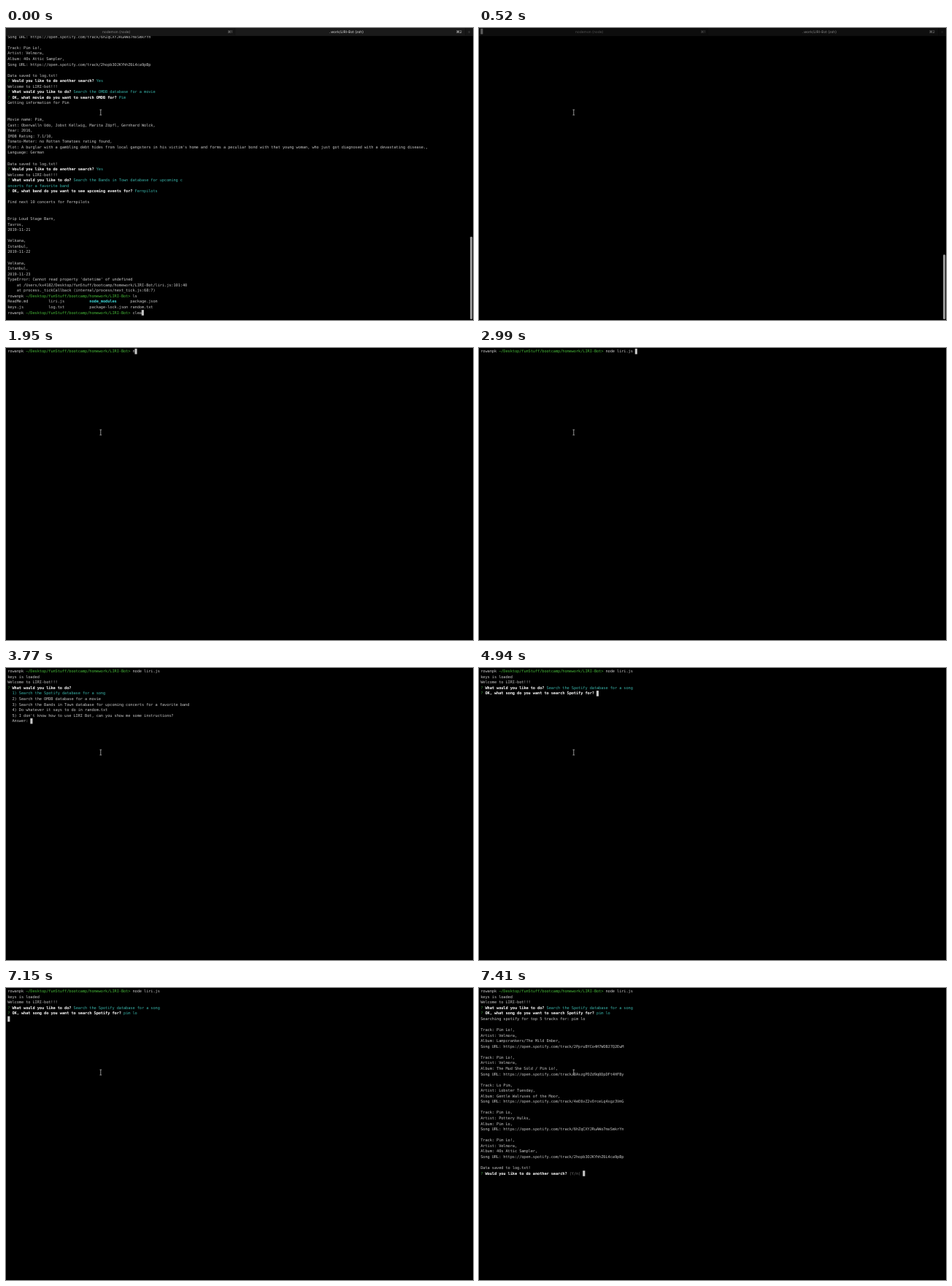
Write an HTML page that moves like this. It is 640x400 px and loops after 8 s.

```html
<!DOCTYPE html>
<html lang="en">
<head>
<meta charset="utf-8">
<title>Terminal session</title>
<style>
html, body { margin: 0; width: 640px; height: 400px; overflow: hidden; background: #000; }
/* Laid out as a 1440 x 900 screen, shown at 4/9 size */
#screen { position: absolute; width: 1440px; height: 900px; overflow: hidden; background: #000;
  transform: scale(.444444); transform-origin: 0 0; text-rendering: geometricPrecision; }
#term { position: absolute; left: 5px; top: 2px; margin: 0; color: #c4c4c4;
  font: 12px/17px "DejaVu Sans Mono", monospace; letter-spacing: -.22px; font-variant-ligatures: none; }
#term b { color: #fff; }
#term i { font-style: normal; }
.path { color: #45b838; }
.mark { color: #3b8a3b; }
.cyan { color: #38b2a8; }
.dim { color: #707070; }
#term b.cyan { color: #3fd8d8; }
.cursor { display: inline-block; width: 7px; height: 17px; vertical-align: top; background: #c8c8c8; }
#tabs { position: absolute; inset: 0 0 auto; height: 24px; background: #161616;
  border-bottom: 1px solid #222; box-sizing: border-box; color: #8c8c8c;
  font: 11px/24px Inter, sans-serif; }
#tabs div { position: absolute; top: 0; height: 23px; box-sizing: border-box; border-right: 1px solid #0c0c0c; }
#tabs span { position: absolute; transform: translateX(-50%); white-space: nowrap; }
#tabs .active { background: #1a1a1a; color: #e0e0e0; }
#tabs .more { left: 1428px; color: #555; }
#bar { position: absolute; left: 1431px; width: 7px; bottom: 2px; border-radius: 4px; background: #969696; }
#mouse { position: absolute; left: 285px; top: 250px; fill: none; stroke: #a0a0a0; stroke-width: 2; }
</style>
</head>
<body>
<div id="screen">
  <pre id="term"></pre>
  <div id="tabs">
    <div style="left:0;width:707px"><span style="left:340px">nodemon (node)</span><span style="left:691px">⌘1</span></div>
    <div class="active" style="left:707px;width:710px"><span style="left:342px">..work/LIRI-Bot (zsh)</span><span style="left:690px">⌘2</span></div>
    <span class="more">≡</span>
  </div>
  <div id="bar"></div>
  <svg id="mouse" width="16" height="20"><path d="M4 2h6M7 2v16M4 18h6"/></svg>
</div>
<script>
const LOOP = 8000;
const $ = id => document.getElementById(id);
const tag = (name, text) => `<i class="${name}">${text}</i>`;
const cyan = text => tag("cyan", text);
const cursor = '<i class="cursor"></i>';
const prompt = cmd => `rowanpk ${tag("path", "~/Desktop/funStuff/bootcamp/homework/LIRI-Bot>")} ${cmd}`;
const ask = (question, answer = "") => `${tag("mark", "?")} <b>${question}</b> ${answer}`;

const welcome = "Welcome to LIRI-bot!!!";
const saved = "Data saved to log.txt!";
const again = "Would you like to do another search?";
const what = "What would you like to do?";
const songSearch = "Search the Spotify database for a song";

const song = (title, artist, album, id) => `Track: ${title},
Artist: ${artist},
Album: ${album},
Song URL: https://open.spotify.com/track/${id}
`;
const songs = [
  ["Pim Lo!", "Velmora", "Lampcrankers/The Mild Ember", "2PpruBYCo4H7WOBJ7Q2EwM"],
  ["Pim Lo!", "Velmora", "The Mud She Sold / Pim Lo!", "8AszgPDZd9q0DpDFt4HFBy"],
  ["Lo Pim", "Lobster Tuesday", "Gentle Walruses of the Moor", "4eE6vZ2vOrceLq4xgz3VmG"],
  ["Pim Lo", "Pottery Hulks", "Pim Lo", "6hZqCXYJRuAWo7mxSmkrYn"],
  ["Pim Lo!", "Velmora", "40s Attic Sampler", "2hopb3OJKYhhZ6L4ca9pBp"],
].map(s => song(...s));

const concert = (place, city, day) => `${place},\n${city},\n2019-11-${day}`;

const history = `
${songs[3].split("\n")[3]}

${songs[4]}
${saved}
${ask(again, cyan("Yes"))}
${welcome}
${ask(what, cyan("Search the OMDB database for a movie"))}
${ask("OK, what movie do you want to search OMDB for?", cyan("Pim"))}
Getting information for Pim


Movie name: Pim,
Cast: Oberwalln Udo, Jobst Kellwig, Marita Zöpfl, Gernhard Wolck,
Year: 2016,
IMDB Rating: 7.1/10,
Tomato-Meter: no Rotten Tomatoes rating found,
Plot: A burglar with a gambling debt hides from local gangsters in his victim's home and forms a peculiar bond with that young woman, who just got diagnosed with a devastating disease.,
Language: German

${saved}
${ask(again, cyan("Yes"))}
${welcome}
${ask(what, cyan("Search the Bands in Town database for upcoming c\noncerts for a favorite band"))}
${ask("OK, what band do you want to see upcoming events for?", cyan("Fernpilots"))}

Find next 10 concerts for Fernpilots


${concert("Drip Loud Stage Barn", "Tavros", 21)}

${concert("Velkana", "Istanbul", 22)}

${concert("Velkana", "Istanbul", 23)}
TypeError: Cannot read property 'datetime' of undefined
    at /Users/kx4182/Desktop/funStuff/bootcamp/homework/LIRI-Bot/liri.js:101:40
    at process._tickCallback (internal/process/next_tick.js:68:7)
${prompt("ls")}
ReadMe.md         liri.js           <b class="cyan">node_modules</b>      package.json
keys.js           log.txt           package-lock.json random.txt
`;

const menu = `${ask(what)}
${cyan("  1) " + songSearch)}
  2) Search the OMDB database for a movie
  3) Search the Bands in Town database for upcoming concerts for a favorite band
  4) Do whatever it says to do in random.txt
  5) I don't know how to use LIRI Bot, can you show me some instructions?
  Answer: `;

const results = `Searching spotify for top 5 tracks for: pim lo

${songs.join("\n")}
${saved}
${ask(again, tag("dim", "(Y/n)"))} `;

// Value of the last step that has begun
const at = (t, steps) => steps.filter(([start]) => start <= t).pop()[1];

const command = [[0, ""], [1950, "n"], [2080, "no"], [2210, "node"], [2340, "node l"],
  [2600, "node li"], [2730, "node lir"], [2990, "node liri.js "]];
const query = [[0, ""], [5850, "p"], [5980, "pi"], [6110, "pin"], [6370, "pi"],
  [6630, "pim "], [6760, "pim l"], [6890, "pim lo"]];
const tabFade = [[0, 1], [390, .85], [520, .6], [650, 0]];
const barFade = [[0, 1], [1040, .5], [1170, 0]];

function session(t) {
  if (t < 390) return history + prompt(t < 100 ? "clea" : "clear");
  if (t < 650) return "";
  let text = prompt(at(t, command));
  if (t < 3380) return text;
  text += "\nkeys is loaded\n";
  if (t < 3770) return text;
  text += welcome + "\n";
  if (t < 4940) return text + menu;
  const typed = at(t, query);
  text += ask(what, cyan(songSearch)) + "\n" +
    ask("OK, what song do you want to search Spotify for?", t < 7150 ? typed : cyan(typed));
  if (t < 7150) return text;
  return text + "\n" + (t < 7410 ? "" : results);
}

let shown;
function draw() {
  const t = performance.now() % LOOP;
  const text = session(t) + cursor;
  if (text !== shown) $("term").innerHTML = shown = text;
  $("tabs").style.opacity = at(t, tabFade);
  $("bar").style.opacity = at(t, barFade);
  $("bar").style.top = (t < 390 ? 643 : 698) + "px";
  requestAnimationFrame(draw);
}
draw();
</script>
</body>
</html>
```
